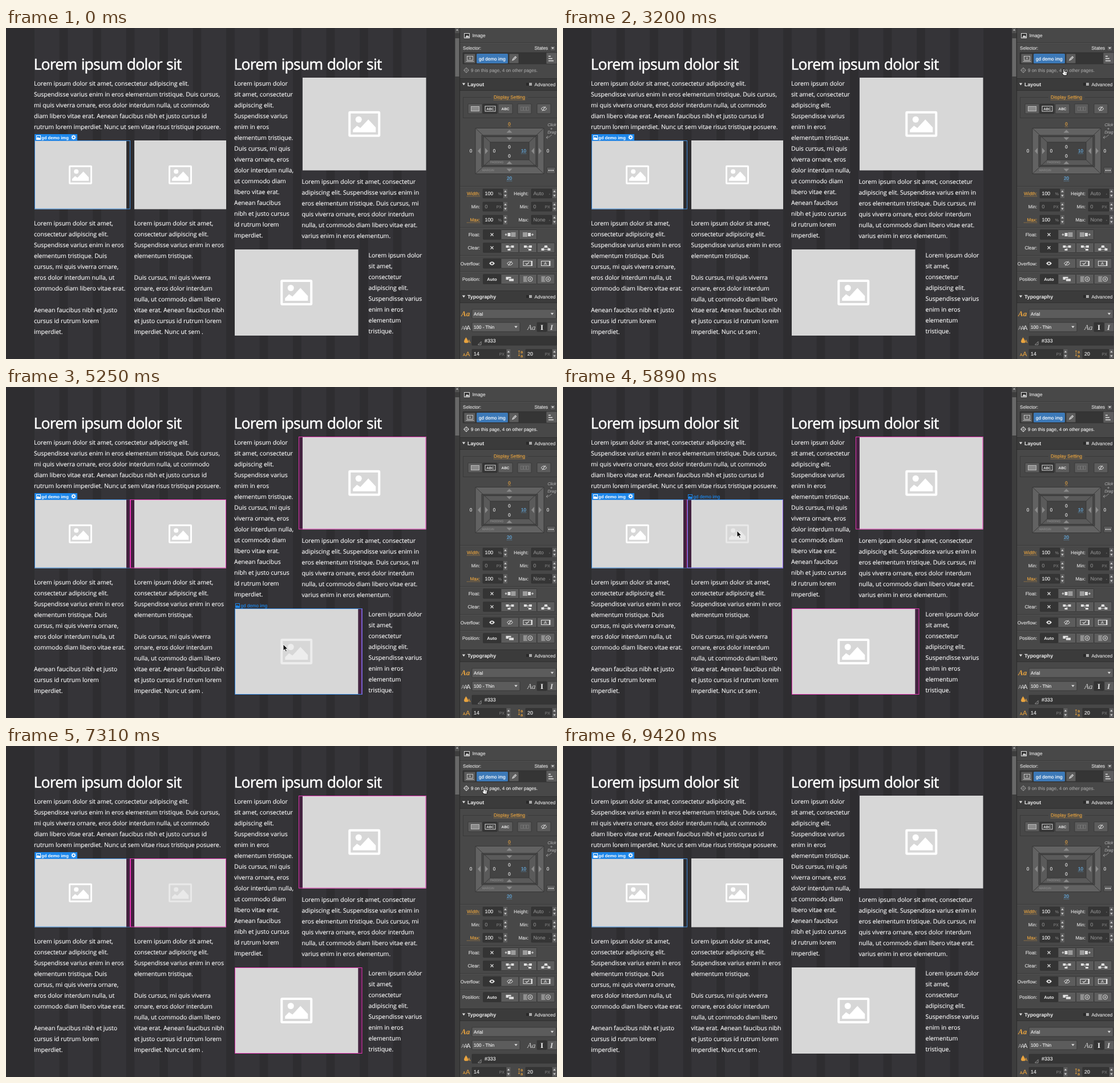
Write an HTML page that moves like this. It is 966 by 580 pixels and loops after 9.94 s.

```html
<!DOCTYPE html>
<html lang="en">
<head>
<meta charset="utf-8">
<title>Style panel demo</title>
<style>
html, body { margin: 0; width: 100%; height: 100%; overflow: hidden; background: #2e2d30; }
svg { display: block; width: 966px; height: 580px; }
text { text-rendering: geometricPrecision; white-space: pre; }
.page text { font-family: "Open Sans", "Noto Sans", sans-serif; }
.ui text { font-family: "Liberation Sans", Arial, sans-serif; }
</style>
</head>
<body>
<svg id="stage" viewBox="0 0 966 580" xmlns="http://www.w3.org/2000/svg"></svg>
<script>
const LIGHT = '#dedede', ORANGE = '#e9a43f', BLUE = '#67b5ef', ACCENT = '#1c86ea', PINK = '#e436b4';
const rect = (x, y, w, h, fill, more = '') => `<rect x="${x}" y="${y}" width="${w}" height="${h}" fill="${fill}" ${more}/>`;
const path = (d, fill, more = '') => `<path d="${d}" fill="${fill}" ${more}/>`;
const line = (d, color = LIGHT, w = 1) => path(d, 'none', `stroke="${color}" stroke-width="${w}"`);
const text = (x, y, s, fill = LIGHT, size = 8.1, more = 'stroke-width=".16"') =>
  `<text x="${x}" y="${y}" fill="${fill}" stroke="${fill}" font-size="${size}" ${more}>${s}</text>`;
const THIN = 'stroke-width=".16"', END = THIN + ' text-anchor="end"', MID = THIN + ' text-anchor="middle"';
const BOLD = 'font-weight="700"', HEAVY = BOLD + ' stroke="none"';
const under = (x, y, w, color) => path(`M${x} ${y}h${w}`, 'none', `stroke="${color}" stroke-width=".8" stroke-dasharray="1 1"`);
const outline = (b, color) => rect(b.x + .5, b.y + .5, b.w - 1, b.h - 1, 'none', `stroke="${color}"`);

// Outer boxes with margin; "img" is the filled part
const boxes = [
  { x: 50, y: 197, w: 168, h: 120.5, img: [50, 161], s: .73 },
  { x: 218, y: 197, w: 168, h: 120.5, img: [225, 161], s: .73 },
  { x: 513, y: 87, w: 223.5, h: 162.5, img: [520, 216.5], s: 1 },
  { x: 401, y: 388, w: 223.5, h: 151, img: [401, 216.5], s: 1 }
];

const copy = [
  [49, 101, `Lorem ipsum dolor sit amet, consectetur adipiscing elit.|Suspendisse varius enim in eros elementum tristique. Duis cursus,|mi quis viverra ornare, eros dolor interdum nulla, ut commodo|diam libero vitae erat. Aenean faucibus nibh et justo cursus id|rutrum lorem imperdiet. Nunc ut sem vitae risus tristique posuere.`],
  [49, 346, `Lorem ipsum dolor sit amet,|consectetur adipiscing elit.|Suspendisse varius enim in eros|elementum tristique. Duis|cursus, mi quis viverra ornare,|eros dolor interdum nulla, ut|commodo diam libero vitae erat.||Aenean faucibus nibh et justo|cursus id rutrum lorem|imperdiet.`],
  [224.5, 346, `Lorem ipsum dolor sit amet,|consectetur adipiscing elit.|Suspendisse varius enim in eros|elementum tristique.||Duis cursus, mi quis viverra|ornare, eros dolor interdum|nulla, ut commodo diam libero|vitae erat. Aenean faucibus nibh|et justo cursus id rutrum lorem|imperdiet. Nunc ut sem .`],
  [400, 101, `Lorem ipsum dolor|sit amet, consectetur|adipiscing elit.|Suspendisse varius|enim in eros|elementum tristique.|Duis cursus, mi quis|viverra ornare, eros|dolor interdum nulla,|ut commodo diam|libero vitae erat.|Aenean faucibus|nibh et justo cursus|id rutrum lorem|imperdiet.`],
  [518.5, 273, `Lorem ipsum dolor sit amet, consectetur|adipiscing elit. Suspendisse varius enim in|eros elementum tristique. Duis cursus, mi|quis viverra ornare, eros dolor interdum|nulla, ut commodo diam libero vitae erat.|varius enim in eros elementum.`],
  [635.5, 402, `Lorem ipsum dolor|sit amet,|consectetur|adipiscing elit.|Suspendisse varius|enim in eros|elementum|tristique.`]
];

function picture(b, i) {
  const cx = b.img[0] + b.img[1] / 2, cy = b.y + b.h / 2;
  return rect(b.img[0], b.y, b.img[1], b.h, '#d7d7d7') +
    `<g id="icon${i}" transform="translate(${cx},${cy}) scale(${b.s})">` +
    rect(-26, -20.5, 52, 41, 'none', 'stroke="#fff" stroke-width="4" rx="1"') +
    `<circle cx="-10" cy="-8" r="5.500" fill="#fff"/>` +
    path('M-20 14.500V10L-13 3l6 4L7-8 20 6V14.500z', '#fff') + '</g>';
}

function page() {
  let s = rect(0, 0, 788, 580, '#2e2d30');
  for (let i = 0; i < 12; i++) s += rect(49.8 + i * 58.5, 0, 43.9, 580, '#353438');
  for (const x of [48.5, 399.5]) s += text(x, 73, 'Lorem ipsum dolor sit', '#fff', 26.5, 'letter-spacing="-.75" word-spacing="1.2" stroke-width=".55"');
  for (const [x, y, t] of copy)
    t.split('|').forEach((l, i) => { if (l) s += text(x, y + i * 19, l, '#fafafa', 10.57); });
  return `<g class="page">${s}${boxes.map(picture).join('')}</g>`;
}

const thumb = (x, y, c) => rect(x + .5, y + .5, 7, 7, 'none', `stroke="${c}"`) +
  path(`M${x + 1} ${y + 7}v-2l2-2 2 2 1-1 1 1v2z`, c);

function tag() {
  let s = rect(50, 186, 75, 11, ACCENT) + thumb(53, 188, '#fff') +
    text(62, 194.5, 'gd demo img', '#fff', 7.7, BOLD + ' stroke-width="0"');
  s += '<circle cx="118.500" cy="191.500" r="2.300" fill="none" stroke="#fff" stroke-width="1.600"/>';
  for (let a = 0; a < 360; a += 45) s += `<path d="M118.500 189v-1.700" stroke="#fff" stroke-width="1.200" transform="rotate(${a} 118.500 191.500)"/>`;
  return `<g class="ui">${outline(boxes[0], '#3f8fe0')}${s}</g>`;
}

function marks() {
  const shade = (x, y, h) => rect(x, y, 7, h, '#4a1f45', 'opacity=".75"');
  const s = shade(211, 197, 120) + shade(218, 197, 120) + shade(513, 87, 162) + shade(617.5, 388, 151);
  return `<g id="marks">${s}${boxes.slice(1).map(b => outline(b, PINK)).join('')}${rect(217, 197, 1, 120, PINK)}</g>`;
}

function hover(b, i) {
  const x = b.x + 1;
  return `<g id="hover${i}" class="ui">${outline(b, '#3489e4')}${rect(b.x + b.w - 1, b.y, 1, b.h, '#8d60ee')}` +
    thumb(x, b.y - 9, ACCENT) + text(x + 9.5, b.y - 2, 'gd demo img', ACCENT, 8.1) + '</g>';
}

const button = (x, y, w, h, on) => rect(x, y, w, h, on ? '#343434' : '#5c5c5c', 'stroke="#333" stroke-width=".8" rx="1"');
const field = (x, y, w, h = 16) => rect(x, y, w, h, '#353535', 'stroke="#2d2d2d" stroke-width=".6" rx="1"');
const tri = (x, y, w, h, c = LIGHT) => path(`M${x - w} ${y - h / 2}h${2 * w}l${-w} ${h}z`, c);
const rule = y => rect(796, y, 170, 1, '#3a3a3a') + rect(796, y + 1, 170, 1, '#505050');

function spinner(x, y) {
  return rect(x, y, 7, 7.5, '#5e5e5e') + rect(x, y + 8.5, 7, 7.5, '#5e5e5e') +
    tri(x + 3.5, y + 4, 2, -3) + tri(x + 3.5, y + 12, 2, 3);
}

function section(y, name) {
  return rect(796, y, 170, 22, '#3b3b3b') + rect(796, y, 170, 1, '#2f2f2f') + rect(796, y + 21, 170, 1, '#303030') +
    tri(802.5, y + 10.5, 2.7, 4) + text(809, y + 13.5, name, '#eee', 8.9, BOLD + ' stroke-width="0"') +
    rect(912, y + 8, 6, 5, '#292929') + rect(917, y + 8, 5, 5, '#aaa') + text(926.5, y + 13.5, 'Advanced', LIGHT, 8.3);
}

function size(y, label, color, value, unit, label2, value2, unit2) {
  const dim = value === '0' ? '#8b8b8b' : '#eee';
  let s = text(831, y + 3, label, color, 8.1, END) + field(836, y - 8, 35) + text(839.5, y + 3, value, dim, 8.8) +
    text(869, y + 3, unit, '#777', 7, END) + spinner(872, y - 8);
  s += text(916, y + 3, label2, LIGHT, 8.1, END) + field(921, y - 8, 36) + text(924.5, y + 3, value2, '#8b8b8b', 8.8) +
    text(954, y + 3, unit2, '#777', 7, END) + spinner(958, y - 8);
  return color === ORANGE ? s + under(808, y + 5, 23, ORANGE) : s;
}

const eye = (x, y) => path(`M${x - 5} ${y}q5-6.500 10 0q-5 6.500-10 0z`, LIGHT) + `<circle cx="${x}" cy="${y}" r="1.600" fill="#333"/>`;
const noEye = (x, y) => line(`M${x - 5} ${y}q5-6 10 0q-5 6-10 0zM${x - 3} ${y + 4}l6-8M${x - 1} ${y + 1}l2-3`);
const cross = (x, y) => line(`M${x - 2.5} ${y - 2.5}l5 5m0-5l-5 5`, LIGHT, 1.1);
const bars = (x, y) => line(`M${x} ${y - 3}h8m-8 2h8m-8 2h8m-8 2h8`);
const block = (x, y, w = 5, h = 5) => rect(x, y, w, h, LIGHT);

function choice(y, label, n, icons) {
  let s = text(831, y + 3, label, LIGHT, 8.1, END);
  for (let i = 0; i < n; i++) s += button(836.5 + i * 31.5, y - 8.5, 31, 17, !i);
  return s + icons.map((f, i) => f(852 + i * 31.5, y)).join('');
}

const globe = (x, y) => `<circle cx="${x + 4}" cy="${y}" r="4" fill="none" stroke="${LIGHT}"/>` +
  line(`M${x + 4} ${y - 2}v4m-2-2h4M${x - 8} ${y - 4}h7m-7 2h6m-6 2h6m-6 2h6m-6 2h7`, LIGHT, .8);
const fork = k => (x, y) => block(x - 7, y - 4, 5, 4) + block(x + 2, y - 4, 5, 4) +
  block(x + (k ? 1 : -4), y + 2, 5, 3) + line(`M${x - 2} ${y - 2}h4M${x} ${y - 2}v4`, LIGHT, .8);
const frame = mark => (x, y) => rect(x - 8, y - 4, 14, 8, 'none', `stroke="${LIGHT}"`) + rect(x + 6, y - 4.5, 2, 9, LIGHT) + mark(x, y);

function boxModel() {
  const ring = (x, y, w, h, c) => rect(x, y, w, h, c, 'stroke="#363636"');
  let s = ring(823, 175.5, 120, 80, '#626262') + ring(834, 188, 98, 55, '#484848') +
    ring(837, 190.5, 92, 50, '#5a5a5a') + ring(849, 200, 68, 31, '#434343');
  s += line('M823 175.500L849 200M943 175.500L917 200M823 255.500L849 231M943 255.500L917 231', '#3a3a3a');
  for (const [y, h] of [[181, -5], [194, 5], [236, -5], [249, 5]]) s += tri(882.5, y, 5, h, '#8b8b8b');
  for (const [x, d] of [[832, -5], [840, 5], [926, -5], [934, 5]]) s += path(`M${x} 210v11l${d}-5.500z`, '#8b8b8b');
  s += text(849, 237.3, 'PADDING', '#858585', 5.2) + text(835, 251.3, 'MARGIN', '#858585', 5.2);
  for (const [x, y, v, c] of [[882.5, 171, 0, ORANGE], [815, 218, 0, '#eee'], [950, 218, 0, '#eee'], [856, 218, 0, '#eee'],
    [907.5, 218, 10, BLUE], [882.5, 211, 0, '#eee'], [882.5, 227, 0, '#eee'], [882.5, 266, 20, BLUE]]) s += text(x, y, v, c, 8.1, MID);
  s += under(878, 268, 9, BLUE) + under(903, 220, 9, BLUE) + under(880, 173, 5, ORANGE);
  const hand = MID + ' font-style="italic"';
  s += text(957, 172, 'Click', '#a5a5a5', 7, hand) + text(956, 179, '+', '#a5a5a5', 7, hand) + text(957, 185, 'Drag', '#a5a5a5', 7, hand);
  s += line('M957 187q-4 5-10 5m3-3l-3 3 3 2', '#999', .9) + button(948, 244, 15, 11);
  for (const x of [952, 955.5, 959]) s += `<circle cx="${x}" cy="249.500" r="1.100" fill="#eee"/>`;
  return s;
}

function typography() {
  const serif = (x, y, s, c, z, st = 'italic') => `<text x="${x}" y="${y}" fill="${c}" font-size="${z}" style="font-family:'Liberation Serif',serif;font-style:${st}">${s}</text>`;
  const select = (x, y, w, s) => button(x, y, w, 16) + text(x + 3, y + 11, s, '#eee', 8.1) + tri(x + w - 7, y + 8, 2.7, 3.5);
  let s = `<g font-weight="700">${serif(798, 505, 'Aa', ORANGE, 13)}</g>` + select(817, 493, 147.5, 'Arial');
  s += text(798, 528.5, 'A', '#999', 10) + text(802.5, 528.5, 'A', '#bbb', 10.5) + text(807, 528.5, 'A', '#ddd', 11) + select(817, 516, 84, '100 - Thin');
  s += serif(914, 528.5, 'Aa', '#ccc', 13) + button(931, 516, 17, 16, 1) + button(949, 516, 17, 16) +
    `<g font-weight="700">${serif(937, 528.5, 'I', '#fff', 13, 'normal')}${serif(954, 528.5, 'I', '#ddd', 13)}</g>`;
  s += path('M806.500 542q7 10 0 10q-7 0 0-10z', ORANGE) + text(809, 552, 'A', ORANGE, 8) + field(817, 540, 148) +
    path('M833 549.500v5.500h-5.500z', 'none', 'stroke="#aaa" stroke-width=".8"') + text(839, 551, '#333', '#eee', 8.8);
  s += text(801, 575, 'A', ORANGE, 7) + text(806, 575, 'A', ORANGE, 11) + field(817, 563, 60) + text(820, 574, '14', '#eee', 8.8) +
    text(874, 574, 'PX', '#777', 7, END) + spinner(877.5, 563);
  s += text(902, 569.5, 'a', ORANGE, 7.5) + text(902, 577, 'a', ORANGE, 7.5) + line('M899.500 565v10m-1.500-8l1.500-2 1.500 2m-3 6l1.500 2 1.500-2', ORANGE, .7) +
    field(911, 563, 46) + text(914, 574, '20', '#eee', 8.8) + text(954, 574, 'PX', '#777', 7, END) + spinner(958, 563);
  return s;
}

function panel() {
  const caps = BOLD + ' text-anchor="middle" stroke-width="0"';
  let s = rect(787, 0, 8, 580, '#3d3d3d') + rect(787.5, 18, 7, 67, '#686868') + rect(787, 0, 8, 9, '#505050') + tri(791, 3, 2, -3, '#bbb');
  s += rect(795, 0, 171, 580, '#484848') + rect(795, 0, 1, 580, '#2b2b2b');
  s += rect(803.5, 9.5, 9, 8, '#333', `stroke="${LIGHT}"`) + path('M805 16.500l3-4 2 2 1-1 1 3z', LIGHT) + text(817.5, 16.3, 'Image', LIGHT, 8.3) + rule(25);
  s += text(801, 38, 'Selector:') + text(926.5, 38, 'States', LIGHT, 8.4) + button(954, 31, 9, 9) + tri(958.5, 35.5, 2.3, 3);
  s += field(801, 43, 165, 20) + button(803, 45, 20, 17) + rect(808.5, 49.5, 10, 7, 'none', `stroke="${LIGHT}" stroke-width=".8"`) +
    line('M806.500 58.500h14M812 51.500l3 3m0-3l-3 3', LIGHT, .8);
  s += rect(825, 45, 55, 17, '#3c79b8', 'rx="1.500"') + text(829, 56.5, 'gd demo img', '#fff') + button(882, 45, 17, 17) +
    line('M888 56.500l1-2.500 4-4 1.500 1.500-4 4z', LIGHT, 1.2) + button(947, 43, 19, 20) + line('M951 49.500h4m-4 4h7m-7 4h9', LIGHT, 1.4);
  s += '<g id="usage"><circle cx="807" cy="74" r="3.400" fill="none" stroke="#ddd"/>' +
    line('M807 69v3m0 4v3m-5-5h3m4 0h3', '#ddd') + '<circle cx="807" cy="74" r="1" fill="#ddd"/>' +
    text(815, 77, '9 on this page, 4 on other pages.', '#ececec', 8) + '</g>';
  s += section(88, 'Layout') + rect(801.5, 121.5, 170, 36, 'none', 'stroke="#393939"') + rect(851, 119, 64, 5, '#484848') +
    text(882.5, 123.7, 'Display Setting', ORANGE, 8.25, MID) + under(855, 126, 55, ORANGE);
  for (const [x, w, on] of [[810, 25], [836, 25, 1], [863, 25], [897, 24], [931, 24]]) s += button(x, 133, w, 17, on);
  s += rect(815.5, 137.5, 14, 8, '#8a8a8a', 'stroke="#bbb"') + rect(840, 137, 18, 9, 'none', `stroke="${LIGHT}"`) +
    text(849, 143.6, 'ABC', '#eee', 6.3, caps) + text(875.5, 143.7, 'ABC', '#eee', 6.4, caps) + noEye(943, 141.5);
  for (let i = 0; i < 3; i++) s += rect(902.5 + i * 5, 138.5, 4, 6, 'none', 'stroke="#777" stroke-width=".8"');
  s += boxModel() + rule(277);
  s += size(290, 'Width:', ORANGE, '100', '%', 'Height:', 'Auto', '-') + size(313, 'Min:', LIGHT, '0', 'PX', 'Min:', '0', 'PX') +
    size(336, 'Max:', ORANGE, '100', '%', 'Max:', 'None', '-') + rule(349);
  s += choice(362, 'Float:', 3, [cross,
    (x, y) => line(`M${x - 9} ${y}h4m-2-2v4`) + block(x - 4, y - 3, 5, 6) + bars(x + 2, y),
    (x, y) => bars(x - 9, y) + block(x, y - 3, 5, 6) + line(`M${x + 6} ${y}h4m-2-2v4`)]);
  s += choice(385, 'Clear:', 4, [cross, fork(0), fork(1),
    (x, y) => block(x - 2.5, y - 4, 5, 4) + block(x - 8, y + 1, 5, 4) + block(x + 3, y + 1, 5, 4) + line(`M${x - 5} ${y + 1}l3-3m7 3l-3-3M${x - 3} ${y + 3}h6`, LIGHT, .8)]) + rule(398);
  s += choice(412.5, 'Overflow:', 4, [eye, noEye,
    frame((x, y) => line(`M${x - 4} ${y}l2 2 4-4`, LIGHT, 1.2)),
    frame((x, y) => text(x - 1, y + 2.5, 'A', LIGHT, 7, MID))]) + rule(426);
  s += choice(440, 'Position:', 4, [(x, y) => text(x, y + 2.8, 'Auto', '#eee', 7.6, caps),
    (x, y) => block(x - 7, y - 4, 9, 5) + rect(x - 2, y - 1, 9, 5, LIGHT, 'stroke="#555" stroke-width=".8"'), globe, globe]);
  return `<g class="ui">${s}${section(460, 'Typography')}${typography()}</g>`;
}

const arrow = path('M0 0v11l2.600-2.300 1.900 4.200 1.900-.9-1.900-4h3.600z', '#111', 'stroke="#fff" stroke-width=".9"');
const pointer = path('M-1.200 .9q1.300-1.500 2.300 0v4l4 .8q1 .4 .8 2l-.9 4.300h-5.400l-3-4.200q0-1.500 1.200-.9l1 .8z', '#fff', 'stroke="#111"') +
  line('M2.200 7v2.500m2-2v2', '#111', .6);

document.getElementById('stage').innerHTML = page() + tag() + marks() +
  boxes.map((b, i) => i ? hover(b, i) : '').join('') + panel() +
  rect(792.5, 0, 2.2, 580, '#2f8fe6', 'id="divider"') +
  `<g id="cursor"><g id="arrow">${arrow}</g><g id="pointer">${pointer}</g></g>`;

const LOOP = 9940, SHOW = 3420, HIDE = 7480;
// time, x, y of the cursor tip
const route = [
  [1950, 972, 260], [2800, 884, 76], [2910, 879, 71], [3250, 878, 71], [3520, 877, 72], [3920, 800, 98], [4250, 556, 145],
  [4420, 545, 160], [5010, 487, 451], [5260, 486, 451], [5880, 305, 252], [6070, 305, 252],
  [6440, 797, 166], [6530, 814, 153], [6970, 839, 72], [7310, 838, 72], [7560, 838, 73], [7950, 974, 190]
];
const $ = id => document.getElementById(id);
const show = (id, on) => { $(id).style.display = on ? '' : 'none'; };

function cursorAt(t) {
  const i = route.findIndex(k => k[0] > t);
  if (i < 1) return null;
  const [a, x, y] = route[i - 1], [b, u, v] = route[i];
  const p = (t - a) / (b - a), e = p * p * (3 - 2 * p);
  return [x + (u - x) * e, y + (v - y) * e];
}

function draw(t) {
  const c = cursorAt(t), on = t >= SHOW && t < HIDE;
  const inside = b => c && c[0] > b.x && c[0] < b.x + b.w && c[1] > b.y && c[1] < b.y + b.h;
  show('marks', on);
  boxes.forEach((b, i) => { if (i) show('hover' + i, on && inside(b)); });
  $('icon3').style.opacity = on && inside(boxes[3]) ? .55 : 1;
  $('icon1').style.opacity = t > 5740 && on ? .45 : 1;
  $('usage').style.opacity = on ? 1 : .52;
  show('divider', c && Math.abs(c[0] - 797) < 20 && c[1] > 86);
  show('cursor', c);
  if (!c) return;
  const link = c[0] > 800 && c[0] < 934 && c[1] > 66 && c[1] < 86;
  show('arrow', !link);
  show('pointer', link);
  $('cursor').setAttribute('transform', `translate(${c[0].toFixed(1)},${c[1].toFixed(1)})`);
}

const start = performance.now();
function tick() {
  draw((performance.now() - start) % LOOP);
  requestAnimationFrame(tick);
}
tick();
</script>
</body>
</html>
```
